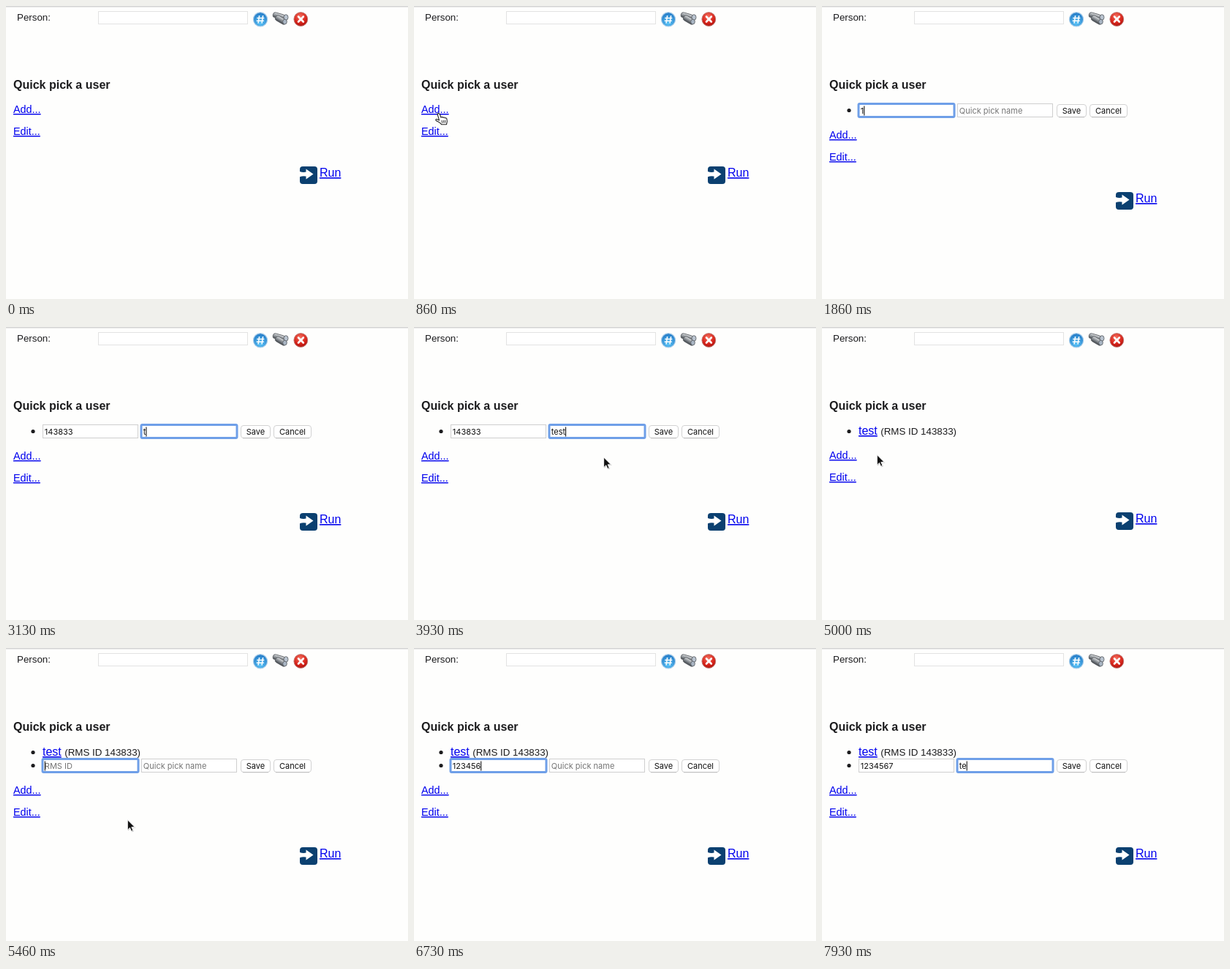
Animation of 550x400 px, one loop 8 s. Source, as an HTML page:

```html
<!DOCTYPE html>
<html lang="en">
<head>
<meta charset="utf-8">
<title>Quick pick a user</title>
<style>
html, body { margin: 0; width: 100%; height: 100%; overflow: hidden; background: #fefefd; }
svg { display: block; width: 550px; height: 400px; font-family: "Liberation Sans", Arial, sans-serif; }
text { fill: #1c1c1e; white-space: pre; }
.link { fill: #0000ee; text-decoration: underline; }
.ui { font: 11px Inter, sans-serif; }
.ui text { fill: #111; }
.ui .hint { fill: #757575; }
.box { fill: #fff; stroke: #cfcfcf; }
.ring { fill: #fff; stroke: #6f9fe8; stroke-width: 3; }
.button { fill: #fff; stroke: #d2d2d2; }
</style>
</head>
<body>
<svg viewBox="0 0 550 400">
  <defs>
    <radialGradient id="blue" cx=".5" cy=".75" r=".75">
      <stop offset="0" stop-color="#5cc4f7"/><stop offset="1" stop-color="#2177c4"/>
    </radialGradient>
    <radialGradient id="red" cx=".45" cy=".3" r=".75">
      <stop offset="0" stop-color="#f4705f"/><stop offset=".6" stop-color="#d8261c"/><stop offset="1" stop-color="#a80f0c"/>
    </radialGradient>
    <linearGradient id="steel" x2="0" y2="1">
      <stop offset="0" stop-color="#e2e4e6"/><stop offset=".5" stop-color="#8d9297"/><stop offset="1" stop-color="#3f444a"/>
    </linearGradient>
  </defs>
  <rect width="550" height="400" fill="#fefefd"/>
  <rect width="550" height="1.5" fill="#d4d4d4"/>

  <text x="15" y="20" font-size="13.33">Person:</text>
  <rect x="126.5" y="7.5" width="204" height="17" fill="#fff" stroke="#e3e3e3"/>

  <circle cx="348" cy="18.3" r="9.6" fill="url(#blue)" stroke="#a9cdea" stroke-width="1.2"/>
  <path d="M346.6 13l-1.6 10.6M351.6 13l-1.6 10.6M343.3 16.5h10M342.7 20.2h10" stroke="#fff" stroke-width="1.5"/>

  <g stroke="#55595e" stroke-width=".8">
    <rect x="-9" y="-3.6" width="17" height="7" rx="3" transform="translate(374 14) rotate(16)" fill="url(#steel)"/>
    <rect x="-8" y="-3.8" width="16" height="7.5" rx="3" transform="translate(376 19) rotate(30)" fill="url(#steel)"/>
    <ellipse cx="383" cy="15.5" rx="3" ry="3.8" fill="#b9c3cf"/>
    <ellipse cx="381.5" cy="21.5" rx="2.8" ry="3.4" fill="#aab6c4"/>
  </g>

  <circle cx="403.3" cy="18" r="9.4" fill="url(#red)" stroke="#bb7770" stroke-width=".9"/>
  <path d="M400 14.5l6.8 7M406.8 14.5l-6.8 7" stroke="#fff" stroke-width="2.6" stroke-linecap="round"/>

  <text x="10" y="113" font-size="16" font-weight="bold">Quick pick a user</text>

  <g id="saved">
    <circle cx="37" cy="142.5" r="2.6" fill="#1c1c1e"/>
    <text x="50" y="147" font-size="16" class="link">test</text>
    <text x="80.3" y="147" font-size="13.33">(RMS ID 143833)</text>
  </g>

  <g id="form" class="ui">
    <circle cx="37" cy="142.5" r="2.6" fill="#1c1c1e"/>
    <g id="fields"></g>
    <rect class="button" x="321.5" y="134.5" width="40" height="17" rx="3.5"/>
    <rect class="button" x="366.5" y="134.5" width="51" height="17" rx="3.5"/>
    <path d="M324 151.7h35M369 151.7h46" stroke="#bcbcbc"/>
    <text x="341.5" y="147" text-anchor="middle">Save</text>
    <text x="392" y="147" text-anchor="middle">Cancel</text>
  </g>

  <g id="below">
    <text x="10" y="146" font-size="14.4" class="link">Add...</text>
    <text x="10" y="176" font-size="14.4" class="link">Edit...</text>
    <rect x="402" y="219" width="24" height="24" rx="4" fill="#0b4070"/>
    <path d="M402 226q4 1.4 8.5.6v-4l10 7-10 7v-4q-4.500-1-8.500.6z" fill="#fff"/>
    <text x="429" y="233" font-size="16" class="link">Run</text>
  </g>

  <g id="arrow">
    <path d="M1 1.500V15.500l3.400-3 2 4.700 2.500-1-2-4.700h4.600z" fill="#000" opacity=".22"/>
    <path d="M.3.6V14.400l3.200-3 2 4.800 2.300-1-2-4.700h4.300z" fill="#111" stroke="#fff" stroke-width=".9"/>
  </g>
  <g id="hand" stroke="#222" stroke-linejoin="round" stroke-linecap="round">
    <path d="M-3 .3c1.300-1.400 3-.2 3.500 1l1.500 3.900c1-1 2.300-.8 2.800.2 1-.8 2.200-.4 2.600.6 1.200-.6 2.300 0 2.500 1.200l.4 3.500-.8 4h-7c-1-2-4.500-3.500-7.500-5.500-.8-1.200.4-2.200 1.800-1.400l2.700 1.300z" fill="#fff" stroke-width="1.100"/>
    <path d="M3 9.500l.6 3M5.300 9.300l.4 3M7.500 9.200l.2 3" fill="none" stroke-width=".9"/>
  </g>
</svg>
<script>
const LOOP = 8000, TICK = 200 / 3;
const $ = id => document.getElementById(id);

function add(parent, tag, attrs) {
  const el = document.createElementNS("http://www.w3.org/2000/svg", tag);
  for (const key in attrs) el.setAttribute(key, attrs[key]);
  return parent.appendChild(el);
}

function makeField(x, hint) {
  const group = $("fields");
  const box = add(group, "rect", { y: 133.5, height: 18 });
  const text = add(group, "text", { x: x + 2.8, y: 147 });
  const caret = add(group, "rect", { y: 136.5, width: 1, height: 13, fill: "#000" });
  return (value, focused) => {
    box.setAttribute("class", focused ? "ring" : "box");
    box.setAttribute("rx", focused ? 1.5 : 0);
    box.setAttribute("x", focused ? x : x + .5);
    box.setAttribute("width", focused ? 131 : 130);
    text.setAttribute("class", value ? "" : "hint");
    text.textContent = value || hint;
    show(caret, focused);
    const width = value ? text.getComputedTextLength() : 0;
    caret.setAttribute("x", x + 2.8 + width);
  };
}

const idField = makeField(50, "RMS ID");
const nameField = makeField(185, "Quick pick name");

// Each entry session: opening and closing tick, vertical offset, keystroke ticks.
const sessions = [
  { open: 16, close: 64, y: 0, tab: 43,
    id: ["143833", [28, 31, 32, 36, 39, 41]], name: ["test", [47, 49, 53, 54]] },
  { open: 80, close: 120, y: 18, tab: 110,
    id: ["1234567", [89, 92, 93, 94, 97, 101, 106]], name: ["te", [117, 119]] }
];

// Pointer trips: visible from..to, with [tick, x, y] waypoints.
const trips = [
  { from: 3, to: 27, path: [[3, 217, 371], [5, 178, 322], [7, 128, 258], [9, 80, 200], [11, 46, 158],
    [13, 35, 147], [19, 35, 147], [21, 85, 178], [23, 150, 214], [25, 175, 226]] },
  { from: 55, to: 89, path: [[55, 178, 224], [58, 235, 190], [61, 308, 152], [63, 329, 143], [67, 329, 143],
    [69, 300, 148], [72, 190, 162], [75, 75, 174], [78, 34, 178], [80, 33, 178], [81, 105, 212],
    [82, 166, 234], [83, 180, 241], [86, 191, 247]] }
];
const hovers = [[12, 17], [77, 81]];

const typed = ([text, ticks], n) => text.slice(0, ticks.filter(k => k <= n).length);
const show = (el, on) => el.setAttribute("visibility", on ? "inherit" : "hidden");
const move = (el, x, y) => el.setAttribute("transform", `translate(${x} ${y})`);

function along(path, n) {
  const i = path.findIndex(p => p[0] > n);
  if (i < 0) return path[path.length - 1].slice(1);
  if (i === 0) return path[0].slice(1);
  const a = path[i - 1], b = path[i], k = (n - a[0]) / (b[0] - a[0]);
  return [1, 2].map(j => a[j] + (b[j] - a[j]) * k);
}

function render(time) {
  const n = Math.floor((time + 7) / TICK) % 120;
  const session = sessions.find(s => n >= s.open && n < s.close);
  const saved = n >= sessions[0].close;

  show($("saved"), saved);
  show($("form"), !!session);
  move($("below"), 0, session ? 35 + session.y : saved ? 34 : 0);
  if (session) {
    move($("form"), 0, session.y);
    idField(typed(session.id, n), n < session.tab);
    nameField(typed(session.name, n), n >= session.tab);
  }

  const trip = trips.find(p => n >= p.from && n < p.to);
  const hovering = hovers.some(([from, to]) => n >= from && n < to);
  show($("arrow"), trip && !hovering);
  show($("hand"), trip && hovering);
  if (trip) move($(hovering ? "hand" : "arrow"), ...along(trip.path, n));
}

const start = performance.now();
function frame() {
  render((performance.now() - start) % LOOP);
  requestAnimationFrame(frame);
}
frame();
</script>
</body>
</html>
```
